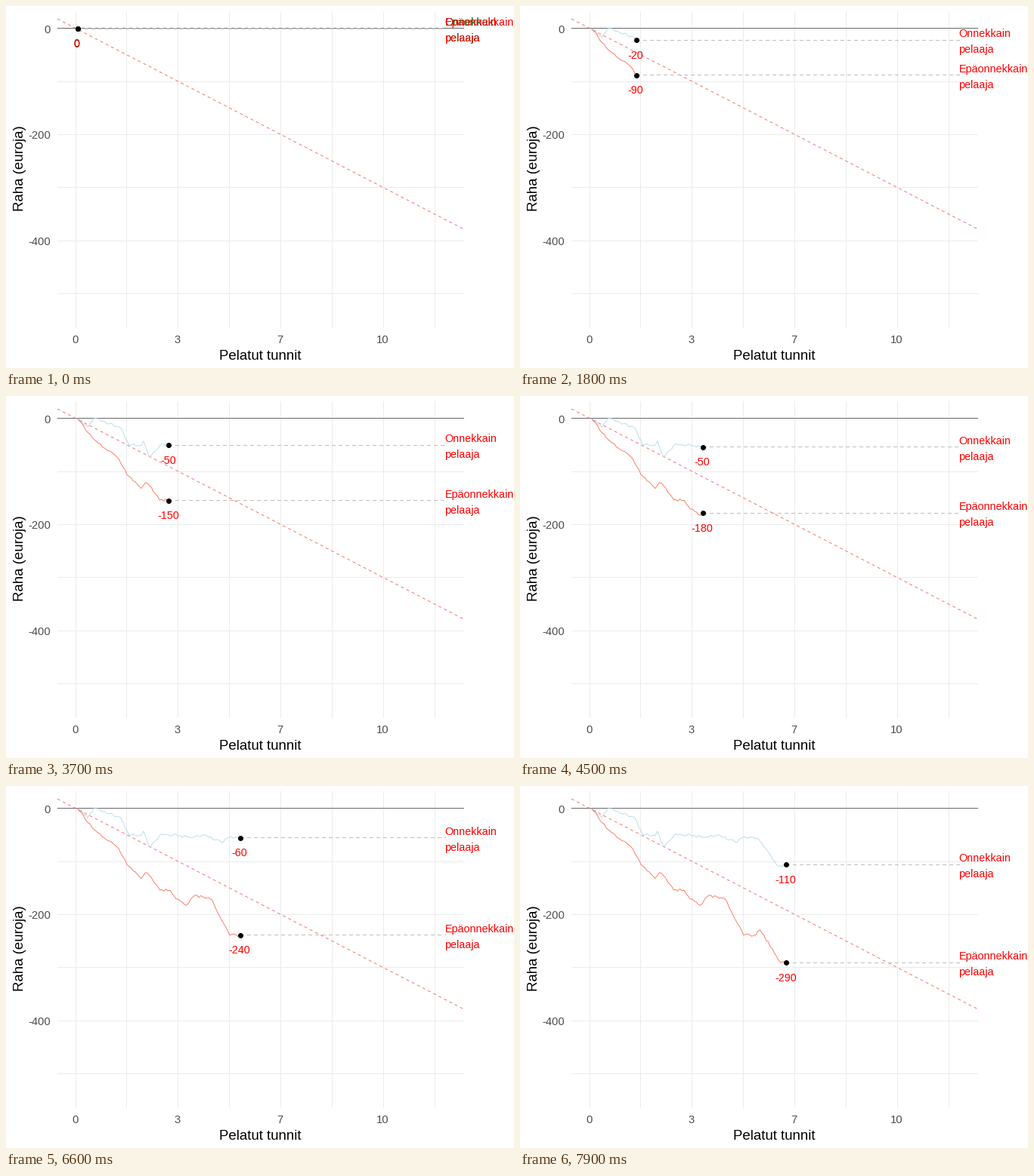
These frames come from a looping animation (672x480 px, 8 s). A matplotlib script:

```python
import numpy as np
import matplotlib.pyplot as plt
from matplotlib.animation import FuncAnimation

W, H, DPI = 672, 480, 96
FRAMES, INTERVAL = 80, 100
LAST_ROUND, FULL_FRAMES = 180, 150     # whole game: 12 hours, 15 rounds each
LEFT, RIGHT, TOP, BOTTOM = 68, 605, 7, 426
LABEL_X = 580.5

plt.rcParams["font.family"] = "Liberation Sans"
plt.rcParams["path.simplify"] = False

# (round, euros) at the main turns; the rounds between wander at random
LUCKY = [(1, 0), (6, -17), (9, 1), (15, -9), (22, -18), (26, -50), (32, -51),
         (33, -43), (36, -73), (42, -48), (55, -54), (64, -52), (71, -64),
         (75, -54), (82, -56), (92, -109), (96, -106)]
UNLUCKY = [(1, -1), (9, -40), (21, -76), (25, -106), (32, -132), (34, -121),
           (36, -127), (41, -154), (46, -154), (49, -171), (54, -183),
           (58, -164), (66, -171), (75, -239), (80, -239), (83, -229),
           (93, -290), (96, -291)]


def px(rounds):
    return 92.1 + 2.715 * np.asarray(rounds, float)


def py(euros):
    return 29.6 - 0.704 * np.asarray(euros, float)


def pt(pixels):
    return pixels * 72 / DPI


def cell(v):
    """Centre line of the pixel row or column that holds v."""
    return np.floor(v)


fig = plt.figure(figsize=(W / DPI, H / DPI), dpi=DPI, facecolor="white")
ax = fig.add_axes([0, 0, 1, 1])
ax.set_xlim(0, W)
ax.set_ylim(H, 0)
ax.axis("off")


def line(x, y, color, z, dashed=False, width=1.0, crisp=True):
    style = (0, (4 / width, 4 / width)) if dashed else "-"
    return ax.plot(x, y, color=color, lw=pt(width), ls=style, zorder=z,
                   antialiased=not crisp, snap=crisp, dash_capstyle="butt")[0]


def text(x, y, s, size, color, ha="center", va="baseline", **kw):
    return ax.text(x, y, s, fontsize=pt(size), color=color, ha=ha, va=va,
                   zorder=8, **kw)


def draw_chart():
    for r in range(0, 176, 25):
        line([cell(px(r))] * 2, [TOP, BOTTOM], "#EBEBEB", 1)
    for e in range(0, -501, -100):
        line([LEFT, RIGHT], [cell(py(e))] * 2, "#EBEBEB", 1)
    for r in range(0, 151, 50):
        text(px(r) - 0.8, 447, f"{r / 15:.0f}", 14.7, "#4D4D4D")
    for e in (0, -200, -400):
        text(59, py(e) + 6, str(e), 14.7, "#4D4D4D", ha="right")
    text(336, 469, "Pelatut tunnit", 18.67, "black")
    text(18.5, 215.5, "Raha (euroja)", 18.67, "black", rotation=90, va="center")
    line([LEFT, RIGHT], [cell(py(0))] * 2, "#6A6A6A", 2)
    # expected loss: two euros per round
    ends = np.array([-8.88, 188.9])
    line(px(ends), py(-2 * ends), "#FF5050", 3, dashed=True, width=0.8, crisp=False)


def wander(points, rng):
    """Money after every round: straight between the turns, plus small steps."""
    turns, values = np.array(points, float).T
    rounds = np.arange(turns[0], turns[-1] + 1)
    steps = rng.uniform(-2.5, 2.5, rounds.size)
    steps[np.isin(rounds, turns)] = 0
    return rounds, np.interp(rounds, turns, values) + steps


class Player:
    def __init__(self, points, name, color, rng):
        self.rounds, self.euros = wander(points, rng)
        self.path = line([], [], color, 4, width=0.8, crisp=False)
        self.lead = line([], [], "#BEBEBE", 5, dashed=True)
        self.dot = ax.plot([], [], "o", color="black", ms=pt(7), mew=0, zorder=6)[0]
        self.amount = text(0, 0, "", 14.4, "red")
        self.name = [text(LABEL_X, 0, s, 14.4, "red", ha="left")
                     for s in (name, "pelaaja")]

    def show(self, now):
        money = np.interp(now, self.rounds, self.euros)
        past = self.rounds < now
        x, y = px(now), py(money)
        self.path.set_data(px(np.append(self.rounds[past], now)),
                           py(np.append(self.euros[past], money)))
        self.lead.set_data([x, LABEL_X], [cell(y)] * 2)
        self.dot.set_data([x], [y])
        self.amount.set_position((x - 1, y + 24.5))
        self.amount.set_text(str(round(money / 10) * 10))
        for label, dy in zip(self.name, (-4, 17)):
            label.set_y(y + dy)
        for label in (self.amount, *self.name):
            label.set_color("red" if money < 0 else "darkgreen")


draw_chart()
rng = np.random.default_rng(4)
players = [Player(LUCKY, "Onnekkain", "lightblue", rng),
           Player(UNLUCKY, "Epäonnekkain", "tomato", rng)]


def update(i):
    now = 1 + (LAST_ROUND - 1) * i / (FULL_FRAMES - 1)
    for p in players:
        p.show(now)
    return []


anim = FuncAnimation(fig, update, frames=FRAMES, interval=INTERVAL,
                     repeat=True, repeat_delay=0, blit=False)
plt.show()
```
